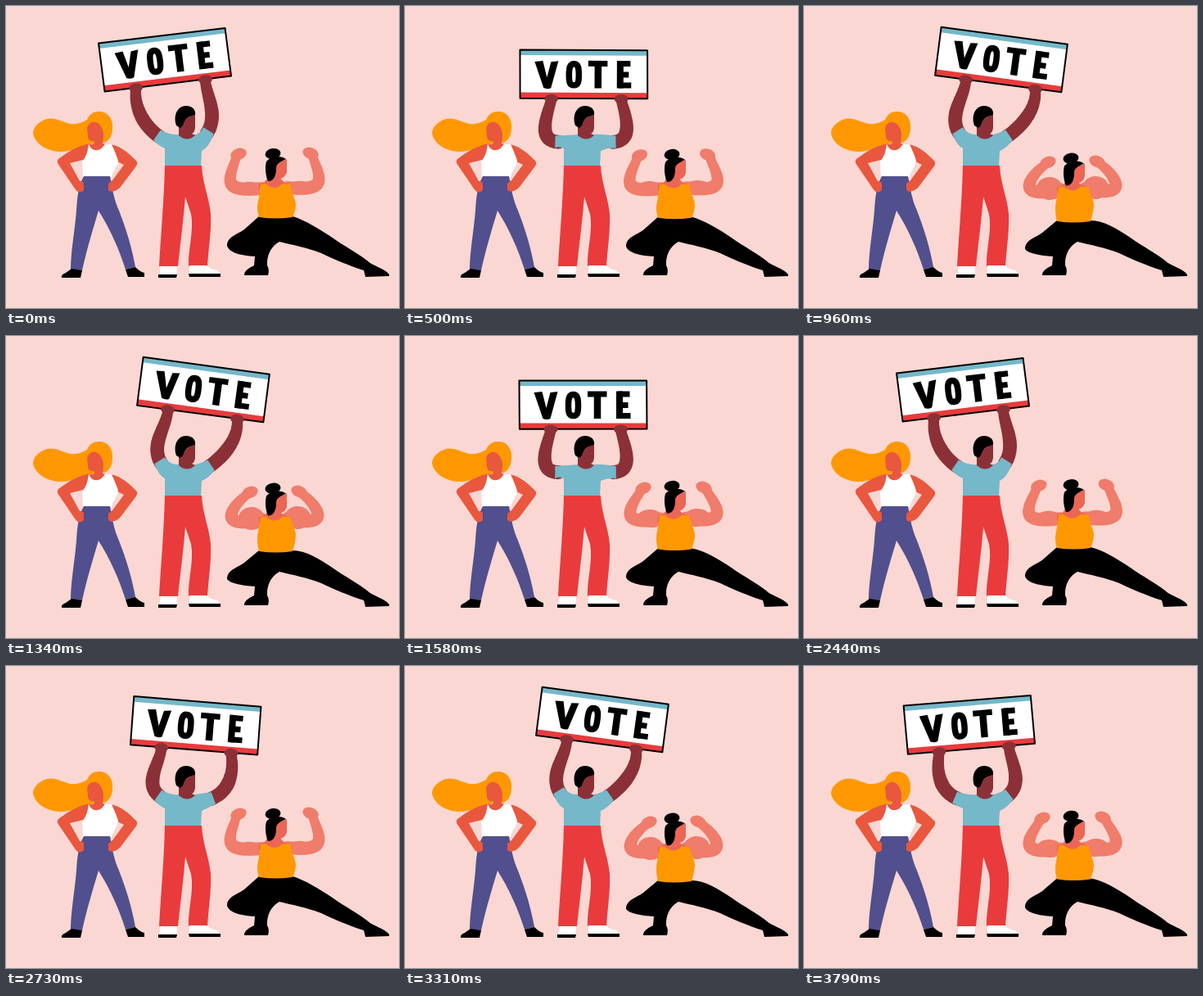
Animation of 480 by 369 pixels, one loop 3.83 s. Source, as an HTML page with a canvas:

```html
<!DOCTYPE html>
<html lang="en">
<head>
<meta charset="utf-8">
<title>Vote</title>
<style>
html, body { margin: 0; width: 100%; height: 100%; overflow: hidden; background: #fad7d2; }
canvas { display: block; width: 480px; height: 369px; }
</style>
</head>
<body>
<canvas id="stage" role="img" aria-label="Three people, one waving a VOTE sign"></canvas>
<script>
const W = 480, H = 369, LOOP = 3830, HOLD = 80, SWING = 480;
const canvas = document.getElementById('stage');
const ctx = canvas.getContext('2d');
const ratio = window.devicePixelRatio || 1;
canvas.width = W * ratio;
canvas.height = H * ratio;

const color = {
  bg: '#fad7d2', orange: '#ff9800', coral: '#e9573f', face: '#ec6656', rose: '#f07c6b',
  brown: '#8b3037', purple: '#514f8d', blue: '#74b8c9', red: '#e93b3c', black: '#000', white: '#fff'
};

// Progress of a move from 0 to 1; each drawing is held for HOLD ms
function ramp(t, start, length = SWING) {
  if (t >= start + length) return 1;
  return Math.max(0, Math.floor((t - start) / HOLD) * HOLD / length);
}

const easeOut = u => 1 - (1 - u) ** 4;

// -1 is far left, 1 is far right: quick to the right, steady to the left
function swingAt(t) {
  const right = easeOut(ramp(t, 420)) + easeOut(ramp(t, 2570));
  const left = ramp(t, 1340) + ramp(t, 3390);
  return 2 * (right - left) - 1;
}

// 0 is fists raised, 1 is fists squeezed in
function squeezeAt(t) {
  const dip = Math.max(0, 1 - Math.abs(t - 1580) / 240) / 2;
  return ramp(t, 420) - dip - ramp(t, 2110, 400) + ramp(t, 2730, 240) - ramp(t, 3390, 400) / 2;
}

function signAt(s) {
  return { x: 217.5 + 23.5 * s, y: 84 - 18.5 * Math.abs(s), turn: (7.3 * s + .4 * s * s) * Math.PI / 180 };
}

function fill(path, c) {
  ctx.fillStyle = c;
  ctx.fill(new Path2D(path));
}

function oval(x, y, rx, ry, turn, c) {
  ctx.fillStyle = c;
  ctx.beginPath();
  ctx.ellipse(x, y, rx, ry, turn, 0, Math.PI * 2);
  ctx.fill();
}

function line(path, width) {
  ctx.lineWidth = width;
  ctx.stroke(new Path2D(path));
}

// Tapered limb along a cubic curve through points a, b, c, d
function limb(a, b, c, d, r0, r1, tint) {
  ctx.fillStyle = tint;
  ctx.beginPath();
  for (let i = 0; i <= 48; i++) {
    const u = i / 48, v = 1 - u;
    const [x, y] = [0, 1].map(k =>
      v * v * v * a[k] + 3 * v * v * u * b[k] + 3 * v * u * u * c[k] + u * u * u * d[k]);
    const r = r0 + (r1 - r0) * Math.min(1, u * 1.7);
    ctx.moveTo(x + r, y);
    ctx.arc(x, y, r, 0, Math.PI * 2);
  }
  ctx.fill();
}

function drawSign({ x, y, turn }) {
  ctx.save();
  ctx.translate(x, y);
  ctx.rotate(turn);
  ctx.fillStyle = color.white;
  ctx.fillRect(-78, -30, 156, 60);
  ctx.fillStyle = color.blue;
  ctx.fillRect(-78, -29, 156, 6);
  ctx.fillStyle = color.red;
  ctx.fillRect(-78, 22.5, 156, 6.5);
  ctx.strokeStyle = color.black;
  ctx.lineJoin = ctx.lineCap = 'round';
  line('M-78 -29.6L77.6 -29.4L78 29.6L-77.6 29.8Z', 2);
  // Hand lettering
  ctx.translate(0, -1);
  fill('M-60 -14L-50 -15L-45 5L-40 -14L-31 -15L-40 18Q-44 20 -49 18Z', color.black);
  ctx.lineJoin = 'miter';
  line('M-12 -11.5C-17 -11.5 -18 -7 -18 2C-18 11 -17 14.5 -12 14.5C-7 14.5 -6 11 -6 2C-6 -7 -7 -11.5 -12 -11.5Z', 7.5);
  ctx.lineCap = 'butt';
  line('M5.5 -12L29 -12', 7);
  line('M17.5 -13L17.5 18', 8.5);
  line('M44.5 -15.5L44.5 18', 8);
  line('M43 -12L57 -12M43 1.5L55 1.5M43 14.5L58 14.5', 7);
  ctx.restore();
}

function drawStandingWoman() {
  fill(`M113 129C124 128 131 138 130 149C130 158 126 165 120 167L106 168C92 171 82 178 66 178
    C48 177 36 168 33 156C33 148 40 141 50 138C58 136 66 140 75 143
    C84 146 92 143 99 139C102 132 107 129 113 129Z`, color.orange);
  fill('M99 149C102 140 112 139 117 149C120 155 119 161 118 168L125 169L118 181L103 180L100 170L108 168L108 165C103 166 100 163 100 159Z', color.coral);
  // Arms on hips
  fill('M103 168C90 170 77 177 64 187Q61 190 65 195L84 223Q88 229 94 227L95 215L90 214L78 192L102 186Z', color.coral);
  fill('M122 168C138 170 146 176 159 189Q162 192 158 197L140 221Q134 228 126 226L125 216L130 213L144 194L132 188Z', color.coral);
  fill('M101 168C104 179 116 179 121 168L129 169C132 176 135 182 137 189C136 197 130 202 129 209L94 209L93 190C99 183 100 176 101 168Z', color.white);
  fill(`M95 208L127 208C130 224 132 237 138 250C147 273 154 296 158 319L146 322C138 297 128 274 113 250
    C107 270 99 296 93 323L79 322C79 300 84 275 86 250C87 235 88 220 95 208Z`, color.purple);
  fill('M86 215Q90 212 95 216L95 225Q90 230 86 225Z', color.coral);
  fill('M125 217Q131 211 136 217L135 224Q129 229 125 225Z', color.coral);
  fill('M68 332Q67 328 73 326L80 321L93 323L91 332Z', color.black);
  fill('M146 322L158 319Q164 325 169 326L169 331L149 331Z', color.black);
}

// Side is -1 for the left arm and 1 for the right; returns the sleeve's two corners
function drawLiftingArm(side, s, sign) {
  const reach = Math.abs(s), lean = s * side;
  const cos = Math.cos(sign.turn), sin = Math.sin(sign.turn);
  const grip = side < 0 ? -39.5 : 46;
  const hand = [sign.x + grip * cos - 32 * sin, sign.y + grip * sin + 32 * cos];
  const cuff = [
    220.5 - 3 * reach + side * (37.25 - 5.75 * reach + 1.5 * lean),
    166.5 - 11.5 * reach + 2.75 * lean
  ];
  const tilt = .8 * reach - .2 * lean;
  const nx = side * Math.cos(tilt), ny = -Math.sin(tilt);
  const wrist = [hand[0] + side * (6 - 4 * reach), hand[1] + 20];
  const elbow = [cuff[0] + 22 * nx, cuff[1] + 22 * ny];
  const shoulder = [cuff[0] - 4 * nx, cuff[1] - 4 * ny];
  limb(hand, wrist, elbow, shoulder, 6.5, 8.5, color.brown);
  oval(hand[0], hand[1] - 2, 8.5, 5.5, sign.turn, color.brown);
  const ex = 7.5 * Math.sin(tilt), ey = 7.5 * Math.cos(tilt);
  return {
    upper: [cuff[0] - side * ex, cuff[1] - ey],
    lower: [cuff[0] + side * ex, cuff[1] + ey]
  };
}

function drawMan(s, sign) {
  const left = drawLiftingArm(-1, s, sign), right = drawLiftingArm(1, s, sign);
  fill(`M${left.upper}Q201 158 211 157L231 157Q237 156 ${right.upper}L${right.lower}
    Q248 173 239 177L238 196L194 196L194 174Q187 171 ${left.lower}Z`, color.blue);
  fill('M231 130L231 149Q230 155 227 156L231 158Q221 167 211 158L211 145Z', color.brown);
  fill('M208 146C204 134 209 122 220 122C228 122 232 127 231 133C225 134 219 137 217 143C216 147 213 150 211 148Z', color.black);
  fill('M194 195L239 195C240 217 248 233 250 254C251 276 247 298 246 318L223 318C222 298 230 274 226 254L219 233C217 260 213 289 210 318L187 318C189 281 193 238 194 195Z', color.red);
  fill('M187 330L189 318L209 318L208 330ZM224 328L224 317L245 317Q250 322 258 323Q262 326 261 329Z', color.white);
  fill('M186 328L209 328L208 332L186 332ZM223 327L262 327L262 331L224 331Z', color.black);
}

function drawFlexArm(q) {
  const fist = [282 + 14 * q, 183 + 10 * q];
  limb(fist, [272 + 8 * q, 212 - 9 * q], [262 - 10 * q, 228 + 10 * q], [312, 223 + q], 5.5, 8, color.rose);
  oval(fist[0] + 2, fist[1] - 2, 10, 7, -.35, color.rose);
  oval(300, 223, 16, 8 + 6 * q, .1, color.rose);
}

function drawLunger(q) {
  const hip = 257 + q * 5, knee = 290 + q * 4, top = 217 + q * 3.4;
  fill(`M309 ${hip}Q329 ${hip + 4} 350 ${hip}C366 262 382 272 400 284C414 294 430 302 441 311
    C448 318 462 320 468 328L468 330L439 331L437 323C418 317 400 309 385 302C367 295 350 292 334 288
    C325 293 320 301 319 312L319 317Q322 322 320 329L291 329Q290 323 303 317
    L304 306C288 305 273 302 270 ${knee + 3}C270 ${knee - 8} 281 ${knee - 10} 291 ${knee - 17}Z`, color.black);

  drawFlexArm(q);
  ctx.save();
  ctx.translate(656, -1);
  ctx.scale(-1, 1);
  drawFlexArm(q);
  ctx.restore();

  const dy = q * 5.6;
  fill(`M319 ${209 + dy}L335 ${209 + dy}Q336 ${top - 2} 349 ${top + 2}L349 ${top + 8}L309 ${top + 8}L309 ${top + 1}Q318 ${top - 1} 319 ${209 + dy}Z`, color.face);
  fill(`M311 ${top + 1}L317 ${top}Q328 ${top + 10} 338 ${top}L348 ${top + 1}C349 229 353 235 354 242
    Q354 250 350 ${hip + 1}Q329 ${hip + 4} 309 ${hip + 1}C305 247 308 240 309 233Z`, color.orange);
  ctx.save();
  ctx.translate(0, dy);
  fill('M343 187L343 203Q341 210 334 211L320 211L322 195Z', color.face);
  fill('M318 190C323 183 336 182 342 187C336 190 330 192 330 198C330 206 328 214 320 214C317 207 316 197 318 190Z', color.black);
  oval(326, 180.5, 9.5, 6.5, -.15, color.black);
  ctx.restore();
}

function draw(now) {
  const t = now % LOOP;
  const s = swingAt(t), sign = signAt(s);
  ctx.setTransform(ratio, 0, 0, ratio, 0, 0);
  ctx.fillStyle = color.bg;
  ctx.fillRect(0, 0, W, H);
  drawStandingWoman();
  drawSign(sign);
  drawMan(s, sign);
  drawLunger(squeezeAt(t));
}

const start = performance.now();
function tick() {
  draw(performance.now() - start);
  requestAnimationFrame(tick);
}
tick();
</script>
</body>
</html>
```
